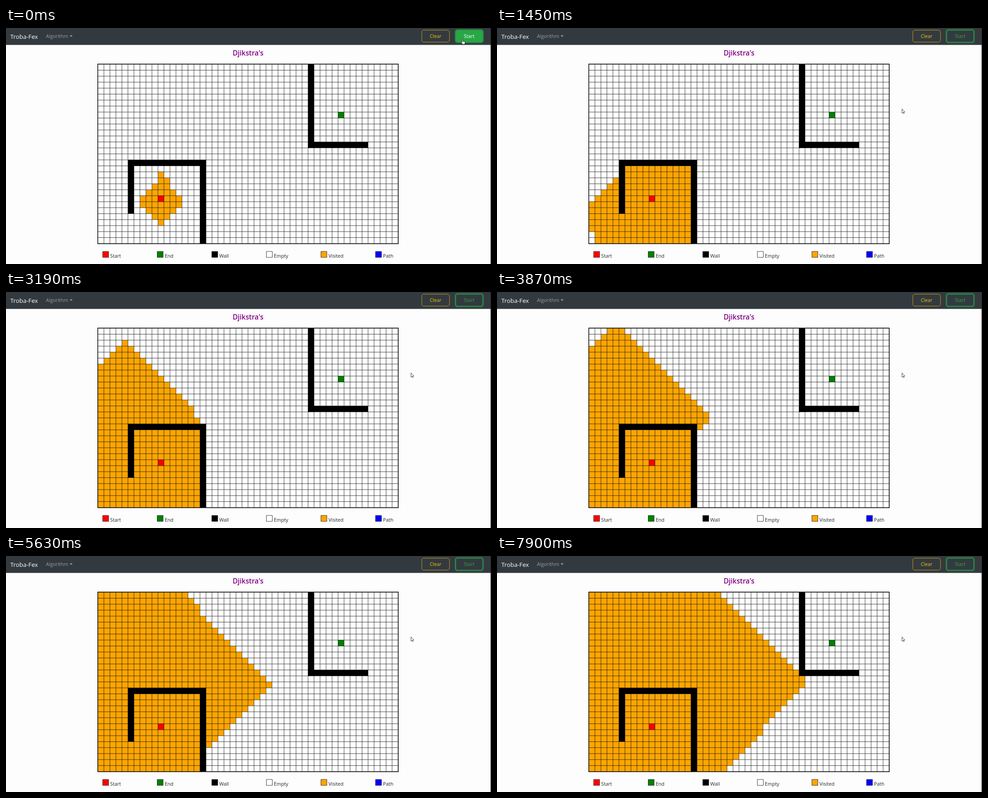
Write an HTML page with a canvas that moves like this. It is 1070 px wide and 523 px high and loops after 8000 ms.

```html
<!DOCTYPE html>
<html lang="en">
<head>
<meta charset="utf-8">
<title>Pathfinding</title>
<style>
html, body { margin: 0; width: 100%; height: 100%; overflow: hidden; background: #fdfdfd; }
canvas { display: block; }
</style>
</head>
<body>
<canvas id="stage" width="1070" height="523"></canvas>
<script>
const ctx = document.getElementById('stage').getContext('2d');
const LOOP = 8000, COLS = 50, ROWS = 30, CELL = 13.245;
const FONT = '"Open Sans", "Noto Sans", sans-serif';
const BAR = '#333a3f', GREEN = '#28a745', AMBER = '#ffc107';
const START = [10, 22], END = [40, 8];

const gx = c => 202.8 + c * CELL;
const gy = r => 80.3 + r * CELL;
const id = (c, r) => r * COLS + c;

// Walls as [column, row, width, height]
const walls = [[5, 16, 13, 1], [5, 16, 1, 9], [17, 16, 1, 14], [35, 0, 1, 14], [35, 13, 10, 1]];

// Breadth-first visiting order: down, up, right, left
function search() {
  const seen = new Set([id(...START)]);
  for (const [c, r, w, h] of walls)
    for (let y = r; y < r + h; y++)
      for (let x = c; x < c + w; x++) seen.add(id(x, y));
  const queue = [START];
  for (let i = 0; i < queue.length; i++) {
    const [c, r] = queue[i];
    for (const [dx, dy] of [[0, 1], [0, -1], [1, 0], [-1, 0]]) {
      const x = c + dx, y = r + dy;
      if (x < 0 || y < 0 || x >= COLS || y >= ROWS || seen.has(id(x, y))) continue;
      seen.add(id(x, y));
      queue.push([x, y]);
    }
  }
  return queue;
}
const order = search();

// Screen refresh times: evenly spaced runs of [first, last, steps]
const runs = [[0, 0, 1], [90, 1070, 7], [1160, 1450, 3], [1650, 2030, 4], [2230, 3190, 7],
  [3480, 4470, 7], [4670, 4670, 1], [4760, 5630, 6], [5840, 6540, 5], [6730, 6830, 2], [7020, 7900, 6]];
const ticks = runs.flatMap(([a, b, n]) =>
  Array.from({ length: n }, (_, i) => Math.round(a + (n > 1 ? (b - a) * i / (n - 1) : 0))));

// Visited cells over time
const progress = [[0, 34], [1450, 191], [3190, 367], [4670, 512], [5630, 620], [6540, 705], [7900, 843]];
function visitedAt(t) {
  for (let i = 1; i < progress.length; i++) {
    const [t0, n0] = progress[i - 1], [t1, n1] = progress[i];
    if (t <= t1) return Math.round(n0 + (n1 - n0) * (t - t0) / (t1 - t0));
  }
  return 843;
}

function text(str, x, y, size, color, weight = 400, align = 'left') {
  ctx.font = `${weight} ${size}px ${FONT}`;
  ctx.fillStyle = color;
  ctx.textAlign = align;
  ctx.fillText(str, x, y);
}

function box(x, y, w, h, r, fill, stroke, lw = 1) {
  ctx.beginPath();
  ctx.roundRect(x, y, w, h, r);
  if (fill) { ctx.fillStyle = fill; ctx.fill(); }
  if (stroke) { ctx.strokeStyle = stroke; ctx.lineWidth = lw; ctx.stroke(); }
}

function cells(c, r, w, h, color) {
  ctx.fillStyle = color;
  ctx.fillRect(gx(c), gy(r), w * CELL, h * CELL);
}

function drawBar(hover) {
  ctx.fillStyle = BAR;
  ctx.fillRect(0, 0, 1070, 37.5);
  text('Troba-Fex', 9.6, 23.5, 13.3, '#fff');
  text('Algorithm', 88, 22, 10.7, '#999c9f');
  ctx.beginPath();
  ctx.moveTo(140.2, 16.3);
  ctx.lineTo(147, 16.3);
  ctx.lineTo(143.6, 19.7);
  ctx.fill();
  box(917.4, 4.8, 61, 26.4, 4.5, null, '#d9a814', 0.9);
  text('Clear', 947.7, 22, 10.6, AMBER, 400, 'center');
  box(991.3, 3.9, 61.4, 28.4, 5, null, '#2b7d43', 2.6);
  box(992.5, 5.1, 59, 26, 4, hover ? GREEN : null, hover ? GREEN : '#28914a');
  text('Start', 1021.7, 22, 10.6, hover ? '#fff' : GREEN, 400, 'center');
}

function drawGrid(count) {
  cells(0, 0, COLS, ROWS, '#fff');
  for (const [c, r] of order.slice(0, count)) cells(c, r, 1, 1, 'orange');
  cells(...START, 1, 1, 'red');
  cells(...END, 1, 1, 'green');
  ctx.beginPath();
  for (let c = 0; c <= COLS; c++) {
    ctx.moveTo(gx(c), gy(0));
    ctx.lineTo(gx(c), gy(ROWS));
  }
  for (let r = 0; r <= ROWS; r++) {
    ctx.moveTo(gx(0), gy(r));
    ctx.lineTo(gx(COLS), gy(r));
  }
  ctx.strokeStyle = 'rgba(0,0,0,.75)';
  ctx.lineWidth = 1;
  ctx.stroke();
  for (const wall of walls) cells(...wall, '#000');
  ctx.strokeStyle = '#000';
  ctx.lineWidth = 1.3;
  ctx.strokeRect(gx(0) - 0.4, gy(0) - 0.4, COLS * CELL + 0.8, ROWS * CELL + 0.8);
}

function drawLegend() {
  const items = [['Start', 'red'], ['End', 'green'], ['Wall', '#000'],
    ['Empty', '#fff'], ['Visited', 'orange'], ['Path', 'blue']];
  items.forEach(([label, color], i) => {
    const x = 213 + i * 120.4;
    box(x + 0.2, 495.2, 13.1, 13.1, 0, color, '#111', 0.8);
    text(label, x + 16.8, 508.6, 10.7, '#212529');
  });
}

function drawPointer(x, y, hand) {
  const shape = hand
    ? 'M0 .8Q1-.6 2 .8V4.4L5.4 5Q6.6 5.4 6.4 7L5.6 11H.6L-2.4 6.8Q-2.6 5.4-1.2 5.6L0 6.6Z'
    : 'M0 0V9.4L2.1 7.5L3.5 10.5L4.9 9.9L3.6 7H6.2Z';
  const path = new Path2D(shape);
  ctx.save();
  ctx.translate(x, y);
  ctx.fillStyle = '#fff';
  ctx.strokeStyle = hand ? '#111' : '#333';
  ctx.lineWidth = 0.9;
  ctx.fill(path);
  ctx.stroke(path);
  ctx.restore();
}

function draw(t) {
  const k = Math.min(1, Math.max(0, (t - 60) / 840));
  const move = k * k * (3 - 2 * k);
  const x = 1006.5 - 113 * move, y = 25 + 154.2 * move;
  const hover = y < 32;
  ctx.fillStyle = '#fdfdfd';
  ctx.fillRect(0, 0, 1070, 523);
  drawBar(hover);
  text("Djikstra's", 534, 61.3, 15.4, 'purple', 600, 'center');
  drawGrid(visitedAt(t));
  drawLegend();
  ctx.fillStyle = '#222';
  ctx.fillRect(1069, 0, 1, 523);
  drawPointer(x, y, hover);
}

const began = performance.now();
function frame() {
  const t = (performance.now() - began) % LOOP;
  draw(ticks.filter(v => v <= t).pop());
  requestAnimationFrame(frame);
}
frame();
</script>
</body>
</html>
```
